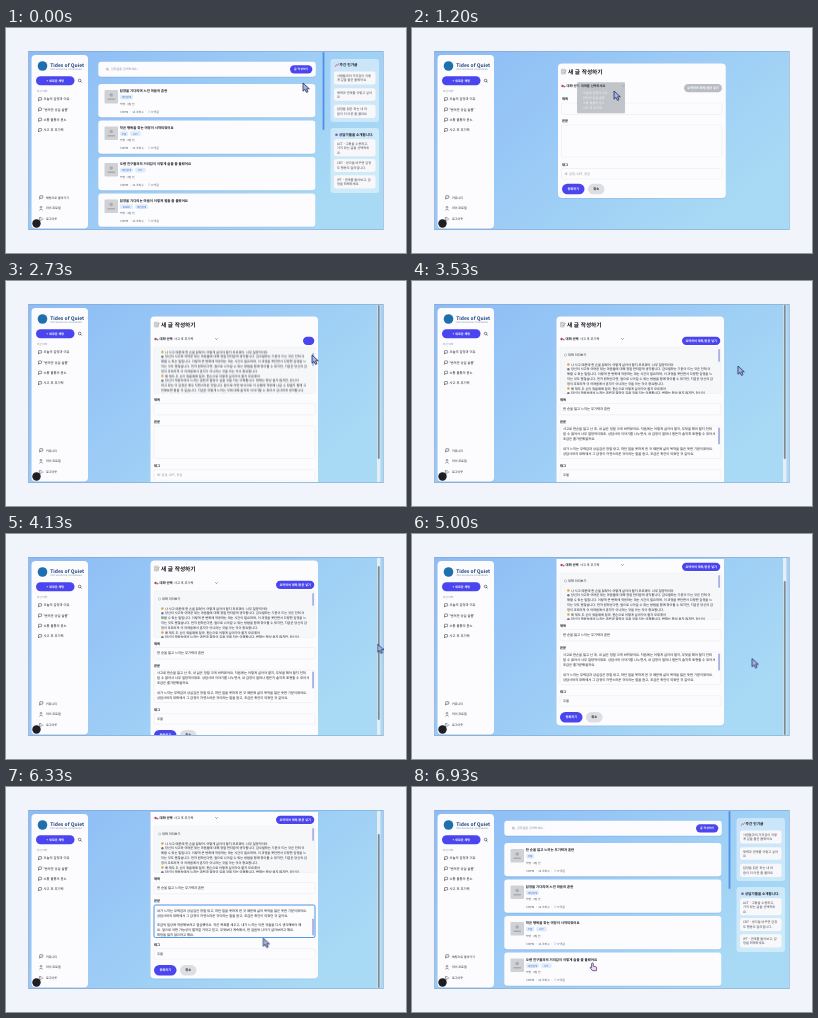
Recreate the animation shown at these times as an HTML page. Size 400 px wide and 225 px high, loop 7 s.

```html
<!DOCTYPE html>
<html lang="ko">
<head>
<meta charset="utf-8">
<style>
html, body { margin: 0; width: 100%; height: 100%; overflow: hidden; background: #f2f4fc; }
svg { display: block; width: 100vw; height: 100vh; }
text {
  font-family: "Noto Sans CJK KR", "Noto Sans CJK", "Noto Sans", sans-serif;
  white-space: pre; text-rendering: geometricPrecision;
}

/* Hard switches between pages and states */
.sw { animation: 7s step-end infinite; }
#home { animation-name: home; }
#form { animation-name: form; }
#homeNew { animation-name: homeNew; }
#empty { animation-name: empty; }
#menu { animation-name: menu; }
#chosen { animation-name: chosen; }
#label { animation-name: label; }
#busy { animation-name: busy; }
#filled { animation-name: filled; }
#blank { animation-name: blank; }
#focus { animation-name: focus; }
#arrow { animation-name: arrow; }
#hand { animation-name: hand; }
@keyframes home { 0% { opacity: 1 } 10.3%, 100% { opacity: 0 } }
@keyframes form { 0% { opacity: 0 } 10.3% { opacity: 1 } 96%, 100% { opacity: 0 } }
@keyframes homeNew { 0% { opacity: 0 } 96%, 100% { opacity: 1 } }
@keyframes empty { 0% { opacity: 1 } 22.5%, 100% { opacity: 0 } }
@keyframes menu { 0% { opacity: 0 } 15.2% { opacity: 1 } 22.5%, 100% { opacity: 0 } }
@keyframes chosen { 0% { opacity: 0 } 22.5%, 100% { opacity: 1 } }
@keyframes label { 0% { opacity: 1 } 26.5% { opacity: 0 } 46.4%, 100% { opacity: 1 } }
@keyframes busy { 0% { opacity: 0 } 26.5% { opacity: 1 } 46.4%, 100% { opacity: 0 } }
@keyframes filled { 0% { opacity: 0 } 46.4%, 100% { opacity: 1 } }
@keyframes blank { 0% { opacity: 1 } 46.4%, 100% { opacity: 0 } }
@keyframes focus { 0% { opacity: 0 } 74.3%, 100% { opacity: 1 } }
@keyframes arrow { 0% { opacity: 1 } 94%, 100% { opacity: 0 } }
@keyframes hand { 0% { opacity: 0 } 94%, 100% { opacity: 1 } }

/* Scrolling */
.mv { animation: 7s linear infinite; }
#page { animation-name: page; }
#pageThumb { animation-name: pageThumb; }
#chat { animation-name: chat; }
#chatThumb { animation-name: chatThumb; }
#body { animation-name: body; }
#bodyThumb { animation-name: bodyThumb; }
@keyframes page {
  0%, 56.4% { transform: translateY(0) } 59% { transform: translateY(-9px) }
  67%, 100% { transform: translateY(-27px) }
}
@keyframes pageThumb {
  0%, 56.4% { transform: translateY(0) } 59% { transform: translateY(8px) }
  67%, 100% { transform: translateY(23px) }
}
@keyframes chat {
  0%, 27.8% { transform: translateY(0) } 29.6% { transform: translateY(-3.5px) }
  39%, 46.39% { transform: translateY(-12.5px) } 46.4%, 100% { transform: translateY(0) }
}
@keyframes chatThumb {
  0%, 27.8% { transform: translateY(0) } 29.6% { transform: translateY(1px) }
  39%, 46.39% { transform: translateY(3.5px) } 46.4%, 100% { transform: translateY(0) }
}
@keyframes body {
  0%, 75% { transform: translateY(0) } 81% { transform: translateY(-13.5px) }
  86%, 100% { transform: translateY(-17px) }
}
@keyframes bodyThumb {
  0%, 75% { transform: translateY(0) } 81% { transform: translateY(9px) }
  86%, 100% { transform: translateY(12px) }
}
#cursor { animation: cursor 7s ease-in-out infinite; }
@keyframes cursor {
  0% { transform: translate(297px, 55px) }
  5%, 10.5% { transform: translate(295px, 41px) }
  14.5%, 15.5% { transform: translate(201px, 59px) }
  17.1%, 18% { transform: translate(202px, 63px) }
  21%, 22.5% { transform: translate(188px, 78px) }
  25.5%, 27% { transform: translate(303px, 60px) }
  29.6% { transform: translate(306px, 72px) }
  39%, 47% { transform: translate(306px, 74px) }
  56%, 59% { transform: translate(371.5px, 110px) }
  67%, 69% { transform: translate(371.5px, 125px) }
  74%, 75% { transform: translate(306px, 124px) }
  81% { transform: translate(306px, 132px) }
  86%, 88% { transform: translate(306px, 135px) }
  94%, 96.5% { transform: translate(164px, 182px) }
  99%, 100% { transform: translate(179px, 176px) }
}
</style>
</head>
<body>
<svg id="stage" viewBox="0 0 400 225"></svg>
<script>
const BLUE = '#4a45ee', INK = '#16191f', GRAY = '#858b96', LINE = '#e6e8ed', CARD = '#fcfcfe';

// y is the vertical middle of the text
const text = (x, y, s, size = 3.2, fill = INK, weight = 500, anchor = 'start') =>
  `<text x="${x}" y="${y + size * 0.36}" font-size="${size}" fill="${fill}" font-weight="${weight}" text-anchor="${anchor}">${s}</text>`;
const box = (x, y, w, h, r, fill, extra = '') =>
  `<rect x="${x}" y="${y}" width="${w}" height="${h}" rx="${r}" fill="${fill}" ${extra}/>`;
const card = (x, y, w, h, r) => box(x, y, w, h, r, CARD, 'filter="url(#soft)"');
const dot = (x, y, r, fill, extra = '') => `<circle cx="${x}" cy="${y}" r="${r}" fill="${fill}" ${extra}/>`;
const line = (d, stroke = INK, w = 0.5) =>
  `<path d="${d}" fill="none" stroke="${stroke}" stroke-width="${w}" stroke-linecap="round" stroke-linejoin="round"/>`;
const group = (id, cls, s) => `<g id="${id}" class="${cls}">${s}</g>`;
const clip = (id, s) => `<g clip-path="url(#${id})">${s}</g>`;
const clipBox = (id, x, y, w, h) => `<clipPath id="${id}">${box(x, y, w, h, 0, '#000')}</clipPath>`;
const pill = (x, y, w, h, fill, s, size, color = '#fff') =>
  box(x, y, w, h, h / 2, fill) + text(x + w / 2, y + h / 2, s, size, color, 600, 'middle');
const field = (x, y, w, h) => box(x, y, w, h, 1.5, CARD, `stroke="${LINE}" stroke-width=".5"`);
const bubble = (x, y, c = INK) =>
  line(`M${x - 1.3} ${y + 1.5}v-2.6q0-.5.5-.5h2.1q.5 0 .5.5v1.5q0 .5-.5.5h-1.7z`, c, 0.45);
const lens = (x, y, r, c) => dot(x, y, r, 'none', `stroke="${c}" stroke-width=".5"`) +
  line(`M${x + r * 0.7} ${y + r * 0.7}l${r * 0.7} ${r * 0.7}`, c);

function sidebar() {
  const chats = ['오늘의 감정과 이유', "'반려견 상실 슬픔'", '소통 불통의 분노', '사고 후 무기력'];
  return card(25.5, 27, 56.5, 173.5, 4) +
    dot(36.5, 38, 4.8, '#1f6fae') +
    text(44.3, 37, 'Tides of Quiet', 4.9, '#1d3f78', 700) +
    text(44.5, 41.3, 'PSYCHOLOGICAL COUNSELING', 2.2, '#6f86a8') +
    pill(30, 48.3, 38.5, 9, BLUE, '+ 새로운 채팅', 3.1) +
    lens(73.6, 52.5, 1.3, INK) +
    text(31, 62.6, '최근 대화', 2.6, GRAY) +
    chats.map((s, i) => bubble(33.8, 71.2 + i * 10.3) + text(37.5, 71.2 + i * 10.3, s, 3.3)).join('') +
    dot(35, 179.3, 0.9, 'none', `stroke="${INK}" stroke-width=".4"`) + line('M33.5 182q1.5-2 3 0', INK, 0.4) +
    text(40, 180.3, '마이 프로필', 3) +
    line('M35 189.5h-1.6v3.2h1.6M34.7 191.1h2.4', INK, 0.4) +
    text(40, 191, '로그아웃', 3) +
    dot(30.5, 195.5, 4.2, '#1d1f24');
}

const posts = [
  ['한 순을 잃고 느끼는 무기력과 혼란', '우울'],
  ['답장을 기다리며 느낀 마음의 혼란', '대인관계'],
  ['작은 행복을 찾는 여정이 시작되었어요', '우울', 'ACT'],
  ['오랜 친구들과의 거리감이 이렇게 슬플 줄 몰랐어요', '대인관계', 'IPT'],
  ['답장을 기다리는 마음이 이렇게 힘들 줄 몰랐어요', 'EMDR', '대인관계']
];

function post([title, ...tags], i) {
  const y = 56 + i * 36.5;
  let x = 114;
  const chips = tags.map(s => {
    const w = s.length * 2.4 + 3.4;
    const chip = box(x, y + 10.8, w, 4.6, 1.4, '#deebfd') +
      text(x + w / 2, y + 13.1, s, 2.5, '#3767b5', 500, 'middle');
    x += w + 2;
    return chip;
  }).join('');
  return card(92.3, y, 217, 33.3, 3) +
    box(98.5, y + 6, 13.5, 13.5, 1, '#cfd1d4') +
    dot(105.2, y + 11, 1.8, '#a9acb1') + box(101.5, y + 14.5, 7.5, 1.6, 0.6, '#a9acb1') +
    text(113.8, y + 6.8, title, 3.4, INK, 700) + chips +
    text(114, y + 20, '익명 · 4일 전', 2.7, '#4b515c') +
    text(114, y + 27.7, '3 BPM  ·  12 조회수  ·  ♡ 0 댓글', 2.8, '#4b515c');
}

function note(y, h, ...rows) {
  return box(328, y, 41.5, h, 2.2, '#f8f8fa') +
    rows.map((s, i) => text(331, y + 4.2 + i * 4.6, s, 3.2, '#3c424d')).join('');
}

function home(list) {
  return bubble(35, 169.3) + text(40, 169.5, '채팅으로 돌아가기', 3) +
    card(92.3, 33.7, 217.5, 15, 3) +
    lens(101.3, 41, 1, GRAY) + text(105, 41.2, '감정글을 검색하세요...', 3, GRAY, 400) +
    pill(284, 37.2, 22.3, 8.3, BLUE, '글 작성하기', 2.9) +
    list.map(post).join('') +
    box(316.6, 24, 1.8, 78, 0.9, '#4f90e8') +
    box(324.5, 31, 48.5, 63, 3, '#fff', 'opacity=".45"') +
    box(324.5, 100, 48.5, 65, 3, '#fff', 'opacity=".45"') +
    line('M329.3 38.5l1.2-2 1 1 1.3-2', '#d8503c', 0.7) +
    text(333.5, 37, '주간 인기글', 3.7, INK, 600) +
    note(43.5, 13, '사람들과의 거리감이 이렇', '게 깊을 줄은 몰랐어요') +
    note(60.3, 12.5, '체력과 관계를 이렇고 싶어', '요') +
    note(76.8, 13.2, '답장을 읽은 하는 내 마', '음이 더 아픈 줄 몰라요') +
    dot(330.5, 106.8, 1.3, '#7c5aa8') +
    text(333, 106.8, '상담가들을 소개합니다.', 3.5, INK, 600) +
    note(111.3, 17, 'ACT - 고통을 수용하고,', '가치 있는 삶을 선택하세', '요.') +
    note(131, 13, 'CBT - 생각을 바꾸면 감정', '도 행동도 달라집니다.') +
    note(147.2, 13.3, 'IPT - 관계를 돌아보고, 감', '정을 회복하세요.');
}

function heading(x) {
  return box(x + 0.4, 41.2, 4, 4.8, 0.5, '#e7e9ee', 'stroke="#777" stroke-width=".35"') +
    line(`M${x + 1.4} 42.7h2M${x + 1.4} 44.2h1.4`, '#777', 0.35) + line(`M${x + 3} 45l2.4-2.6`, '#c09a5a', 0.7) +
    text(x + 7, 43.6, '새 글 작성하기', 5.7, INK, 600);
}
const picker = (x, s) => dot(x + 1.6, 58, 1.2, '#c0474a') + dot(x + 3.6, 58.6, 0.9, '#7b8290') +
  text(x + 5.6, 58, '대화 선택', 3.3, INK, 700) + text(x + 20, 58, s) +
  line(`M${x + 61.6} 57.6l.9.9.9-.9`, INK, 0.45);
const title = (x, y, s) => text(x, y, s, 3.3, INK, 700);
const actions = (x, y) => pill(x, y, 22.5, 10.5, BLUE, '등록하기', 3.2) +
  pill(x + 26, y, 16.5, 10.5, '#dcdee2', '취소', 3.2, INK);
const MAKE = '요약하여 제목/본문 넣기', HINT = '예: 감정, GPT, 공감';

function emptyForm() {
  const options = ['오늘의 감정과 이유', '반려견 상실 슬픔', '소통 불통의 분노', '사고 후 무기력'];
  return card(146, 35.5, 167.8, 134.5, 4) + heading(149) +
    picker(149, '대화를 선택하세요') + pill(272, 56, 38, 8.3, '#b9bcc2', MAKE, 3.1) +
    title(150, 70.8, '제목') + field(149.5, 75, 160.5, 11.5) +
    title(150, 92.8, '본문') + field(149.5, 97, 160.5, 32) +
    title(150, 136.5, '태그') + field(149.5, 140.5, 160.5, 10.5) + text(152.5, 145.7, HINT, 3.1, GRAY) +
    actions(150, 155.7) +
    group('menu', 'sw', box(165, 54.3, 48, 31, 1, '#a9adb1', 'opacity=".7"') +
      text(169, 58, '대화를 선택하세요') +
      options.map((s, i) => text(171, 64.4 + i * 5.2, s, 3.1, '#f4f5f6')).join(''));
}

const talk = [
  '나 사고 때문에 한 손을 잃었어. 어떻게 살아야 할지 모르겠어. 너무 절망적이야',
  '당신의 사고와 어려운 있는 마음들에 대해 정말 안타깝게 생각합니다. 감오랄하는 기분이 드는 것은 전혀 이',
  '해할 수 있는 일입니다. 이렇게 큰 변화에 적응하는 데는 시간이 필요하며, 이 과정을 못던면서 다양한 감정을 느',
  '끼는 것도 괜찮습니다. 먼저 원하신다면, 앞으로 나아갈 수 있는 방법을 함께 찾아볼 수 있지만, 지금은 당신의 감',
  '정이 흐트러져 이 어려움에서 혼자가 아니라는 것을 아는 것이 중요합니다.',
  '왜 제도 두 손이 있을때에 달라. 한손으로 어떻게 살아가야 할지 모르겠어',
  '당신이 막음속에서 느끼는 혼란과 절망이 깊을 것을 저는 이해합니다. 변화는 항상 쉽지 않지만, 당신이',
  '하고 있는 이 감정은 매우 자연스러운 것입니다. 앞으로 어떤 방식으로 이 상황에 적응해 나갈 수 있을지 함께 고',
  '민해보면 좋을 것 같습니다. 지금은 어떻게 느끼는 것에 대해 솔직히 이야기할 수 있어서 감사하게 생각합니다.',
  '고마워. 조금씩 이야기해 볼게'
];
const speakers = { 0: '#d9a441', 1: '#6b7a99', 5: '#d9a441', 6: '#6b7a99', 9: '#d9a441' };
const story = [
  '사고로 한손을 잃고 난 후, 내 삶은 정말 크게 바뀌었어요. 처음에는 어떻게 살아야 할지, 무엇을 해야 할지 전혀',
  '알 수 없어서 너무 절망적이었죠. 상담사와 이야기를 나누면서, 내 감정이 얼마나 힘든지 솔직히 표현할 수 있어서',
  '조금은 홀가분했을까요.',
  '',
  '내가 느끼는 무력감과 상실감은 정말 컸고, 하던 일을 못하게 된 것 때문에 삶의 목적을 잃은 듯한 기분이었어요.',
  '상담사와의 대화에서 그 감정이 자연스러운 것이라는 말을 듣고, 조금은 위안이 되었던 것 같아요.',
  '',
  '조금씩 일상에 적응해보려고 결심했어요. 작은 목표를 세우고, 내가 느끼는 아픈 것들을 다시 생각해봐야 해',
  '요. 앞으로 어떤 가능성이 펼쳐질 거라고 믿고, 무엇보다 계속해서, 한 걸음씩 나아가 살아보려고 해요.',
  '희망을 잃지 않으려고 해요.'
];

function chosenForm() {
  const chat = dot(153.5, 74, 1.2, 'none', `stroke="${GRAY}" stroke-width=".4"`) +
    text(156, 74, '대화 미리보기', 3.2) +
    talk.map((s, i) => {
      const y = 83.5 + i * 4.8, c = speakers[i];
      return c ? dot(156.4, y, 1.2, c) + text(159, y, s) : text(155, y, s);
    }).join('');
  const body = story.map((s, i) => text(151, 148.2 + i * 4.85, s, 3.3)).join('');
  const form = card(144.5, 35.5, 167.5, 183, 4) + heading(148) +
    picker(148, '사고 후 무기력') +
    group('label', 'sw', pill(270, 55.7, 38.3, 8.3, BLUE, MAKE, 3.1)) +
    group('busy', 'sw', box(297, 55.7, 11.3, 8.3, 4.15, BLUE)) +
    box(148, 66, 161, 46.5, 1.5, '#f6f7f9', `stroke="${LINE}" stroke-width=".4"`) +
    clip('chatClip', group('chat', 'mv', chat)) +
    group('chatThumb', 'mv', box(306.2, 68, 1.8, 13, 0.9, '#aab0ea')) +
    title(148, 118.7, '제목') + field(148, 122.5, 161, 11.3) +
    title(148, 141.3, '본문') + field(148, 145, 161, 32.5) +
    title(148, 185, '태그') + field(148, 188.7, 161, 10.5) +
    group('blank', 'sw', text(151, 194, HINT, 3.1, GRAY)) +
    group('filled', 'sw', text(151, 127.6, posts[0][0], 3.3) + text(151, 194, '우울', 3.3) +
      clip('bodyClip', group('body', 'mv', body)) +
      group('bodyThumb', 'mv', box(306.2, 146.5, 1.7, 17, 0.8, '#a4a9e0'))) +
    group('focus', 'sw', box(148, 145, 161, 32.5, 1.5, 'none', 'stroke="#3f8fe0" stroke-width=".9"')) +
    actions(148, 205);
  return clip('view', group('page', 'mv', form)) +
    box(371, 24, 3.4, 177, 0, '#e6eef4') +
    group('pageThumb', 'mv', box(371.8, 24, 1.9, 154, 0.9, '#7f8a95'));
}

const arrow = `<path d="M0 0v8.2l2-1.8 1.5 3 1.5-.7-1.4-2.9h2.7z" fill="#a9b4de" stroke="#1f2b66" stroke-width=".8" stroke-linejoin="round"/>`;
const hand = `<path d="M1.4 0q.9 0 .9.9v2.3l2.5.6q1 .3.9 1.3l-.4 2.6H1.6L-.8 4.9q-.2-.8.6-.8l.8.5V.9q0-.9.8-.9z" fill="#f3d9e4" stroke="#27306b" stroke-width=".7" stroke-linejoin="round"/>`;

document.getElementById('stage').innerHTML =
  `<defs>
    <linearGradient id="sky" x1="0" y1="0" x2="1" y2=".6">
      <stop offset="0" stop-color="#8dbbf6"/><stop offset="1" stop-color="#a8daf5"/>
    </linearGradient>
    <filter id="soft" x="-5%" y="-10%" width="110%" height="125%">
      <feDropShadow dx="0" dy=".5" stdDeviation=".7" flood-color="#3d6a9c" flood-opacity=".25"/>
    </filter>` +
    clipBox('app', 22.3, 23, 355.2, 179) + clipBox('view', 22.3, 25, 355.2, 176) +
    clipBox('chatClip', 148, 66.3, 161, 46) + clipBox('bodyClip', 148, 145.5, 161, 31.5) + '</defs>' +
  box(0, 0, 400, 225, 0, '#f2f4fc') +
  clip('app', box(22.3, 23, 355.2, 179, 0, 'url(#sky)', 'stroke="#7f9fc8" stroke-width="1"') + sidebar() +
    group('home', 'sw', home(posts.slice(1))) +
    group('form', 'sw', bubble(35, 169.3) + text(40, 169.5, '커뮤니티', 3) +
      group('empty', 'sw', emptyForm()) + group('chosen', 'sw', chosenForm())) +
    group('homeNew', 'sw', home(posts.slice(0, 4))) +
    group('cursor', '', group('arrow', 'sw', arrow) + group('hand', 'sw', hand)));
</script>
</body>
</html>
```
